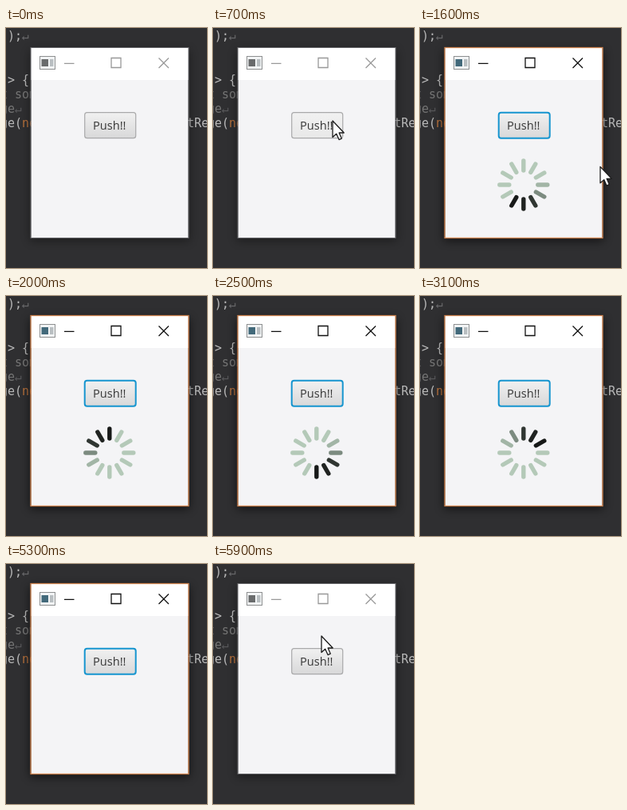
Recreate the animation shown at these times as an HTML page. Size 252 by 300 pixels, loop 6 s.

```html
<!DOCTYPE html>
<html lang="en">
<head>
<meta charset="utf-8">
<title>Push button demo</title>
<style>
  html, body { margin: 0; width: 100%; height: 100%; overflow: hidden; background: #2f2f31; }
  svg { display: block; width: 252px; height: 300px; }
  .code { font: 15px "DejaVu Sans Mono", "Noto Sans Mono", monospace; white-space: pre; }
  .label { font: 14.6px "Open Sans", "Noto Sans", sans-serif; }
</style>
</head>
<body>
<svg viewBox="0 0 252 300" xmlns="http://www.w3.org/2000/svg">
  <defs>
    <linearGradient id="face" x1="0" y1="0" x2="0" y2="1">
      <stop offset="0" stop-color="#f1f1f1"/>
      <stop id="faceEnd" offset="1" stop-color="#dadada"/>
    </linearGradient>
    <filter id="blur" x="-20%" y="-20%" width="140%" height="140%">
      <feGaussianBlur stdDeviation="6"/>
    </filter>
  </defs>

  <rect width="252" height="300" fill="#2f2f31"/>
  <g class="code" fill="#b9b9b9">
    <text x="2" y="15">);<tspan fill="#68686a">↵</tspan></text>
    <text x="2" y="70">&gt; {</text>
    <text x="-7" y="88" fill="#757575">t some</text>
    <text x="-7" y="106" fill="#757575">ge<tspan fill="#58585a">↵</tspan></text>
    <text x="-7" y="124">ge(<tspan fill="#b5703c">new</tspan></text>
    <text x="227" y="124">tRe</text>
  </g>

  <rect id="shadow" x="30" y="28" width="200" height="238" fill="#000" filter="url(#blur)"/>
  <rect x="31.5" y="25" width="197" height="237" fill="#f4f4f6"/>
  <rect x="31.5" y="25" width="197" height="40" fill="#fff"/>
  <rect id="frame" x="31" y="24.5" width="198" height="238" fill="none"/>

  <g id="icon">
    <rect x="42.5" y="35.5" width="19" height="16" fill="#f2f4f5" stroke="#8d8f90"/>
    <rect id="pane" x="44.5" y="39" width="8.5" height="9"/>
    <rect x="55" y="39" width="4.5" height="9" fill="#b9bfc2"/>
  </g>
  <path id="controls" d="M73 44.3H85.500M132 37.500h12v12h-12zM191.500 37.500l12.500 12.500m0-12.500l-12.500 12.500" fill="none" stroke-width="1.3"/>

  <rect id="button" x="98.700" y="105.700" width="64" height="32" rx="3" fill="url(#face)"/>
  <text class="label" x="109" y="127" fill="#383838">Push!!</text>

  <g id="spinner" stroke-width="5.4" stroke-linecap="round"></g>
  <circle id="ring" cx="129.800" cy="195.300" r="25" fill="#fbfbfc" stroke="#0983d6" stroke-width="9.500"/>

  <path id="cursor" d="M0 0V20.500L4.700 16.300L8 23.600L11.300 22.200L8.100 15H14.200Z" fill="#fff" stroke="#1c1c1c" stroke-width="1.300" stroke-linejoin="round"/>
</svg>
<script>
const LOOP = 6000, TICK = 100, SPOKES = 12, SPOKE_MS = 82;
const $ = id => document.getElementById(id);
const set = (id, attrs) => {
  for (const k in attrs) $(id).setAttribute(k, attrs[k]);
};
const show = (id, on) => set(id, { visibility: on ? "visible" : "hidden" });

// Shades from the leading spoke backwards
const TRAIL = ["#171918", "#202321", "#303632", "#7c8b80", "#a2b5a6"];
const REST = "#b4c9b8";

// Cursor runs as [time, x, y] points
const RUNS = [
  [[100, 40, 68], [300, 100, 92], [500, 146, 112], [600, 153, 116], [700, 150, 116]],
  [[700, 150, 116], [900, 151, 120], [1200, 153, 127], [1400, 162, 140], [1700, 258, 190]],
  [[5700, 23, 70], [5800, 84, 94], [5900, 136, 90]]
];

const spokes = Array.from({ length: SPOKES }, (_, i) => {
  const line = document.createElementNS("http://www.w3.org/2000/svg", "line");
  const a = i * 2 * Math.PI / SPOKES;
  const at = r => [129.8 + r * Math.sin(a), 196 - r * Math.cos(a)];
  const [x1, y1] = at(18), [x2, y2] = at(30);
  Object.entries({ x1, y1, x2, y2 }).forEach(([k, v]) => line.setAttribute(k, v));
  $("spinner").append(line);
  return line;
});

function cursorAt(t) {
  for (const run of RUNS) {
    for (let i = 1; i < run.length; i++) {
      const [t0, x0, y0] = run[i - 1], [t1, x1, y1] = run[i];
      if (t < t0 || t > t1) continue;
      const k = (t - t0) / (t1 - t0);
      return [x0 + (x1 - x0) * k, y0 + (y1 - y0) * k];
    }
  }
  return null;
}

function draw(time) {
  const t = Math.floor(time % LOOP / TICK) * TICK;
  const active = t >= 800 && t < 5400;
  const pos = cursorAt(t);
  const hover = pos && pos[0] > 98 && pos[0] < 163 && pos[1] > 105 && pos[1] < 138;

  set("frame", { stroke: active ? "#d08450" : "#77777a", "stroke-width": active ? 1.3 : 0.8 });
  set("shadow", { opacity: active ? 0.6 : 0.4 });
  set("controls", { stroke: active ? "#111" : "#999" });
  set("pane", { fill: active ? "#42697a" : "#696b6c" });
  set("button", {
    stroke: active ? "#1695cf" : "#a9a9aa",
    "stroke-width": active ? 2 : 1.2
  });
  set("faceEnd", { "stop-color": hover ? "#e8e8e8" : "#d8d8d9" });

  show("spinner", t >= 900 && t < 3500);
  show("ring", t >= 3500 && t < 5300);
  const head = 3 + Math.floor((t - 1192) / SPOKE_MS);
  spokes.forEach((s, i) => {
    const lag = ((head - i) % SPOKES + SPOKES) % SPOKES;
    s.setAttribute("stroke", TRAIL[lag] || REST);
  });

  show("cursor", !!pos);
  if (pos) set("cursor", { transform: `translate(${pos[0]} ${pos[1]})` });
}

const start = performance.now();
function tick() {
  draw(performance.now() - start);
  requestAnimationFrame(tick);
}
draw(0);
requestAnimationFrame(tick);
</script>
</body>
</html>
```
